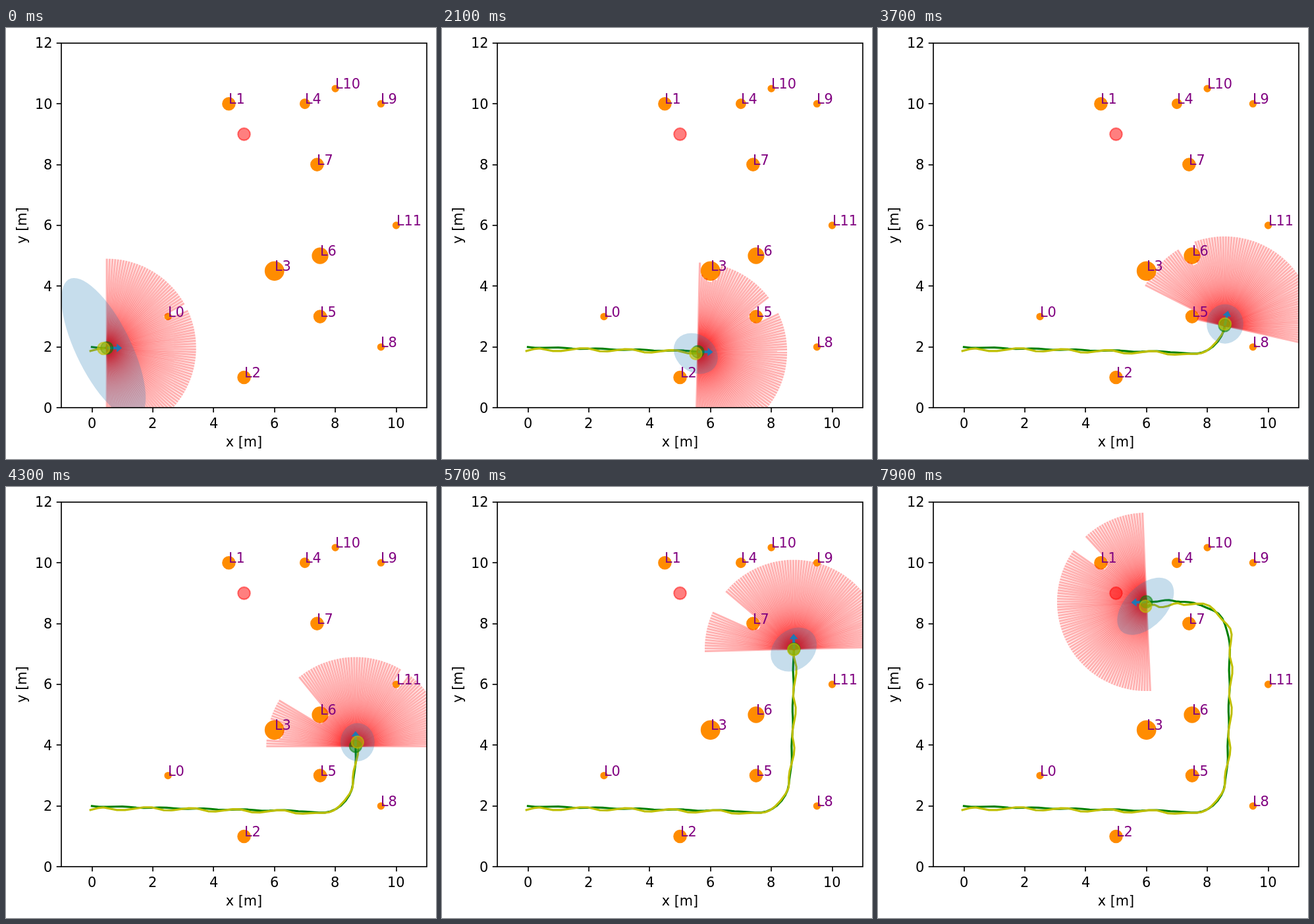
Recreate the animation shown at these times as an HTML page. Size 653x655 px, loop 8000 ms.

```html
<!DOCTYPE html>
<html lang="en">
<head>
<meta charset="utf-8">
<title>Robot localisation</title>
<style>
html, body { margin: 0; width: 100%; height: 100%; overflow: hidden; background: #fff; }
svg { display: block; width: 653px; height: 655px; }
text { font: 20.83px "DejaVu Sans", sans-serif; }
.axis { stroke: #000; stroke-width: 1.67; fill: none; }
.mark { fill: #ff8c00; stroke: #ff8c00; stroke-width: 2.08; }
.name { fill: #800080; }
.track { fill: none; stroke-width: 3.125; stroke-linejoin: round; stroke-linecap: square; }
.disc { stroke-width: 2.08; }
#rays line { stroke: #f00; stroke-opacity: .3; stroke-width: 3.125; stroke-linecap: square; }
</style>
</head>
<body>
<svg viewBox="0 0 653 655">
  <defs><clipPath id="plot"><rect x="84" y="23" width="555" height="554"/></clipPath></defs>
  <g clip-path="url(#plot)">
    <g id="marks"></g>
    <g id="goal"></g>
    <g id="tracks"></g>
    <g id="rays"></g>
    <circle id="cov" r="1" fill="#1f77b4" fill-opacity=".25"/>
    <path id="arrow" fill="#1f77b4" d="M0-2H15V-6.5L23 0L15 6.5V2H0Z"/>
    <g id="discs"></g>
  </g>
  <g id="axes"></g>
  <g id="names"></g>
</svg>
<script>
const STEP_MS = 100, STEPS = 80, LEAD = 2;
const RAYS = 100, RANGE = 29, UNIT = 46.2, DIGIT = 13.25;
const $ = id => document.getElementById(id);
const px = x => 130.5 + UNIT * x;
const py = y => 577.2 - UNIT * y;

// x, y, radius in metres
const landmarks = [
  [2.5, 3, .1], [4.5, 10, .2], [5, 1, .2], [6, 4.5, .3], [7, 10, .15], [7.5, 3, .2],
  [7.5, 5, .25], [7.4, 8, .2], [9.5, 2, .1], [9.5, 10, .1], [8, 10.5, .1], [10, 6, .1]
];

// Robot: step, x, y, heading in degrees
const route = [
  [0, 0, 2, 0], [2, .5, 1.98, 0], [23, 5.6, 1.86, -1.3], [29, 7.03, 1.83, -2],
  [32, 7.65, 1.77, 17], [35, 8.2, 2.03, 42], [38, 8.53, 2.52, 70], [41, 8.63, 3.13, 88],
  [45, 8.68, 3.98, 90], [59, 8.73, 7.15, 91.4], [62, 8.66, 7.77, 107], [65, 8.35, 8.32, 138],
  [68, 7.78, 8.62, 167], [70, 7.38, 8.69, 182.5], [75, 6.73, 8.76, 182.5], [81, 5.98, 8.7, 182.5]
];
// Estimate: step, x and y error, half width and half height in pixels, correlation
const belief = [
  [0, -.05, -.13, 70, 115, -.7], [2, -.16, -.07, 64, 107, -.7], [8, -.04, -.03, 45, 55, -.45],
  [23, -.04, -.03, 33.5, 31, -.2], [32, -.06, -.04, 30, 31, 0], [45, .05, .12, 26, 29, 0],
  [59, .05, .04, 35, 33.5, .22], [70, .05, -.02, 24.5, 25.5, 0], [75, -.02, -.18, 33, 34, .25],
  [81, -.01, -.13, 43, 43.5, .48]
];

// Smooth curve through the key rows, or straight pieces
function at(keys, s, smooth) {
  let i = 0;
  while (i < keys.length - 2 && keys[i + 1][0] <= s) i++;
  const a = keys[i], b = keys[i + 1], before = keys[i - 1] || a, after = keys[i + 2] || b;
  const span = b[0] - a[0], k = (s - a[0]) / span;
  return a.slice(1).map((v, j) => {
    const end = b[j + 1], line = v + (end - v) * k;
    if (!smooth) return line;
    const m0 = (end - before[j + 1]) / (b[0] - before[0]) * span;
    const m1 = (after[j + 1] - v) / (after[0] - a[0]) * span;
    return line + k * (1 - k) * ((1 - k) * (m0 - end + v) + k * (end - v - m1));
  });
}

const wave = (s, period, phase) => Math.sin(2 * Math.PI * (s - phase) / period);

function robot(s) {
  const [x, y, deg] = at(route, s, true), w = .015 * wave(s, 5.5, 13.6);
  return [x + w, y + w, deg];
}
function estimate(s) {
  const [x, y] = at(route, s, true), [dx, dy, ...cov] = at(belief, s);
  const w = .05 * wave(s, 6, 6);
  return [x + dx + w, y + dy + w, ...cov];
}

function add(parent, tag, attrs, text) {
  const el = document.createElementNS("http://www.w3.org/2000/svg", tag);
  set(el, attrs);
  if (text !== undefined) el.textContent = text;
  return $(parent).appendChild(el);
}
function set(el, attrs) {
  for (const k in attrs) el.setAttribute(k, attrs[k]);
}
const disc = (parent, color, alpha) => add(parent, "circle", {
  class: "disc", r: .2 * UNIT, fill: color, stroke: color, "fill-opacity": alpha, "stroke-opacity": alpha
});
const label = (parent, x, y, text, attrs) =>
  add(parent, "text", { x: Math.round(x), y: Math.round(y), ...attrs }, text);

landmarks.forEach(([x, y, r], i) => {
  add("marks", "circle", { class: "mark", cx: px(x), cy: py(y), r: r * UNIT });
  label("names", px(x), py(y), "L" + i, { class: "name" });
});
set(disc("goal", "#f00", .5), { cx: px(5), cy: py(9) });

add("axes", "rect", { class: "axis", x: 84, y: 23, width: 555, height: 554 });
for (let v = 0; v <= 12; v += 2) {
  const width = DIGIT * String(v).length;
  add("axes", "path", { class: "axis", d: `M84 ${Math.round(py(v))}h-7.3` });
  label("axes", 70 - width, py(v) + 7.32, v);
  if (v > 10) continue;
  add("axes", "path", { class: "axis", d: `M${Math.round(px(v))} 577v7.3` });
  label("axes", px(v) - width / 2, 608, v);
}
add("axes", "text", { x: 361.5, y: 636, "text-anchor": "middle" }, "x [m]");
add("axes", "text", { transform: "translate(31 300) rotate(-90)", "text-anchor": "middle" }, "y [m]");

const truthLine = add("tracks", "polyline", { class: "track", stroke: "#008000" });
const guessLine = add("tracks", "polyline", { class: "track", stroke: "#bfbf00" });
const truthDisc = disc("discs", "#008000", .5);
const guessDisc = disc("discs", "#bfbf00", .6);
const rays = Array.from({ length: RAYS }, () => add("rays", "line", {}));

function trail(pose, last) {
  const pts = [];
  for (let s = 0; s <= last; s++) {
    const [x, y] = pose(s);
    pts.push(px(x) + "," + py(y));
  }
  return pts.join(" ");
}

// March in 10 cm steps and stop just before a landmark
function cast(x, y, a) {
  for (let i = 1; i <= RANGE; i++) {
    const ex = x + i / 10 * Math.cos(a), ey = y + i / 10 * Math.sin(a);
    if (landmarks.some(([lx, ly, r]) => Math.hypot(lx - ex, ly - ey) < r)) return (i - 1) / 10;
  }
  return RANGE / 10;
}

function draw(s) {
  const [x, y, deg] = robot(s), [gx, gy, w, h, rho] = estimate(s);
  const cx = px(x), cy = py(y), ex = px(gx), ey = py(gy);
  truthLine.setAttribute("points", trail(robot, s));
  guessLine.setAttribute("points", trail(estimate, s));
  rays.forEach((ray, i) => {
    const a = deg * Math.PI / 180 + Math.PI * (i / (RAYS - 1) - .5);
    const d = cast(x, y, a);
    set(ray, { x1: cx, y1: cy, x2: px(x + d * Math.cos(a)), y2: py(y + d * Math.sin(a)) });
  });
  $("cov").setAttribute("transform",
    `matrix(${w} ${-h * rho} 0 ${-h * Math.sqrt(1 - rho * rho)} ${ex} ${ey})`);
  $("arrow").setAttribute("transform", `translate(${cx} ${cy}) rotate(${-deg})`);
  set(truthDisc, { cx, cy });
  set(guessDisc, { cx: ex, cy: ey });
}

const start = performance.now();
let shown = -1;
function tick() {
  const n = Math.floor((performance.now() - start) / STEP_MS) % STEPS;
  if (n !== shown) draw((shown = n) + LEAD);
  requestAnimationFrame(tick);
}
tick();
</script>
</body>
</html>
```
